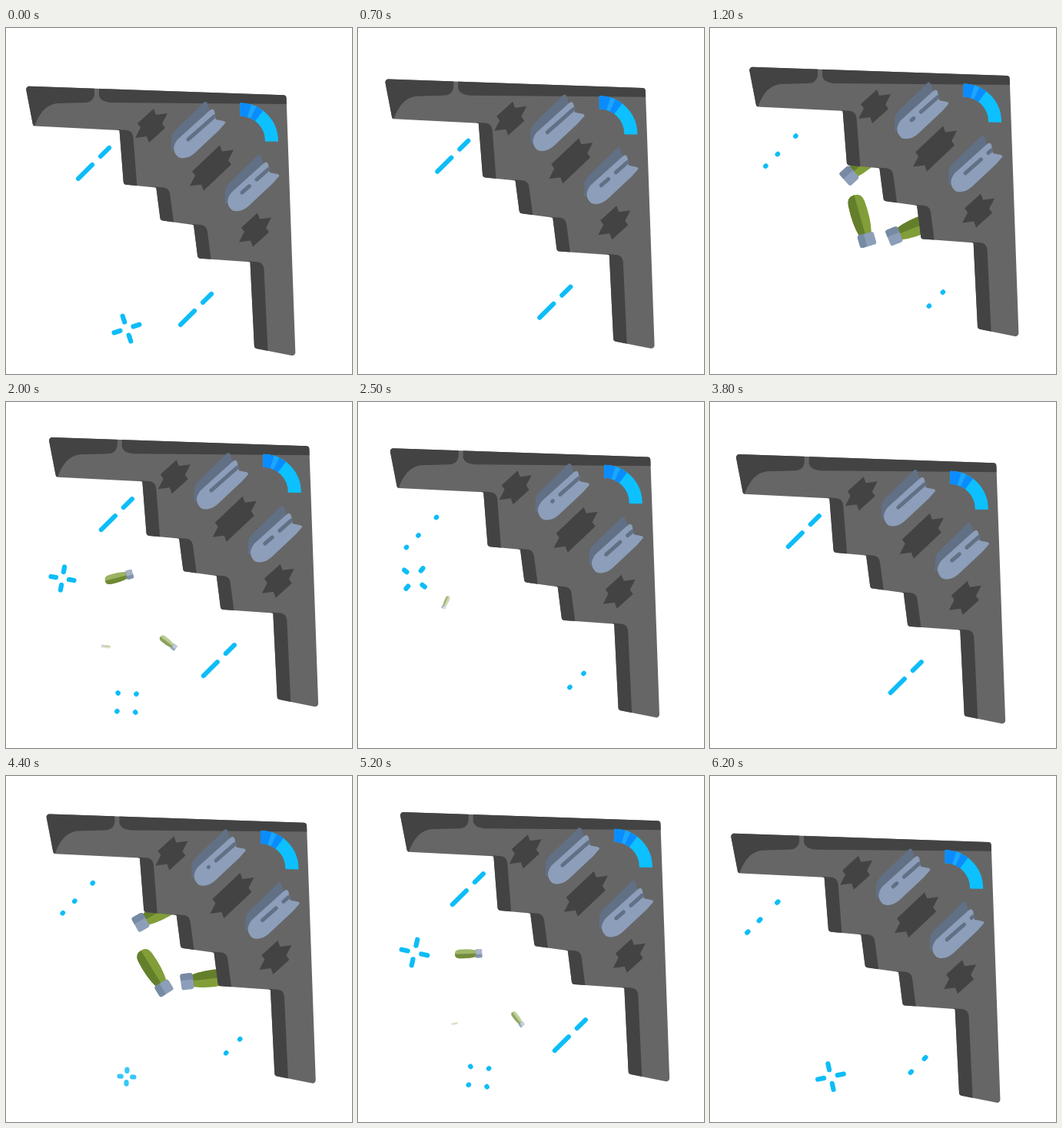
Recreate the animation shown at these times as an HTML page with a canvas. Size 450x450 px, loop 6.3 s.

```html
<!DOCTYPE html>
<html>
<head>
<meta charset="utf-8">
<style>
html, body { margin: 0; width: 100%; height: 100%; overflow: hidden; background: #fff; }
canvas { display: block; }
</style>
</head>
<body>
<canvas id="stage" width="450" height="450"></canvas>
<script>
const ctx = document.getElementById('stage').getContext('2d');
const CYCLE = 3150, FLICKER = 630, STEP = 100, LOOP = 6300;
const GREY = '#666', DARK = '#434343', STEEL = '#8c9eb9', SLATE = '#617085', CYAN = '#0dbdf8';
const clamp = (v, lo = 0, hi = 1) => Math.min(hi, Math.max(lo, v));
const mix = (a, b, k) => a + (b - a) * k;
const rad = deg => deg * Math.PI / 180;

function fill(d, color) {
  ctx.fillStyle = color;
  ctx.fill(new Path2D(d));
}

function line(x1, y1, x2, y2, width, color) {
  ctx.lineWidth = width;
  ctx.strokeStyle = color;
  ctx.lineCap = 'round';
  ctx.beginPath();
  ctx.moveTo(x1, y1);
  ctx.lineTo(x2 + 0.01, y2);
  ctx.stroke();
}

// Steps of the trailing edge: where each one starts and how far it drops.
const steps = [
  { x: 147.5, y: 133, drop: 70.5 },
  { x: 195.3, y: 207.5, drop: 42.5 },
  { x: 244, y: 256, drop: 43.5 },
  { x: 317.5, y: 304.3, drop: 112 }
];

function hull() {
  const points = [[35.3, 127.5, 3]];
  for (const { x, y, drop } of steps) points.push([x, y, 1], [x + 5.5, y + drop, 4]);
  points.push([376.5, 427, 4], [364.5, 87.3, 4], [25.3, 75.7, 4]);
  ctx.beginPath();
  ctx.moveTo(30, 100);
  points.forEach(([x, y, r], i) => {
    const next = points[(i + 1) % points.length];
    ctx.arcTo(x, y, next[0], next[1], r);
  });
  ctx.closePath();
}

function stepShade({ x, y, drop }) {
  ctx.beginPath();
  ctx.moveTo(x - 2, y - 1);
  ctx.lineTo(x + 10, y);
  ctx.quadraticCurveTo(x + 17, y + 1, x + 18, y + 9);
  ctx.lineTo(x + 23, y + drop + 4);
  ctx.lineTo(x + 2, y + drop + 4);
  ctx.fillStyle = DARK;
  ctx.fill();
}

// A ragged diagonal patch: one torn end, repeated by point symmetry.
function patch(x, y, stretch) {
  const end = [[3, -22], [6, -14], [21, -16], [14, -2.5], [18, 3]];
  ctx.beginPath();
  for (const side of [1, -1])
    for (const [px, py] of end) ctx.lineTo(x + side * (px + stretch), y + side * (py - stretch));
  ctx.fillStyle = DARK;
  ctx.fill();
}

function slot(gap) {
  const dash = (a, b) => {
    if (b >= a) line(mix(237, 271, a), mix(145, 115, a), mix(237, 271, b), mix(145, 115, b), 5, SLATE);
  };
  if (gap < -0.05 || gap > 1.05) return dash(0, 1);
  dash(0, gap - 0.14);
  dash(gap + 0.14, 1);
}

function bay(dx, dy, gap) {
  ctx.save();
  ctx.translate(dx, dy);
  fill('M215 160L215 143Q216 137 221 132L257 97Q260 94 262 98L265 108L270 106L226 152Z', SLATE);
  fill('M223 145L264 108Q269 103 271 108L273 119L283 121Q287 122 284 125L277 133L245 163Q234 172 224 168Q213 158 223 145Z', STEEL);
  slot(gap);
  ctx.restore();
}

function gauge() {
  const band = (from, to, color) => {
    ctx.lineWidth = 17;
    ctx.lineCap = 'butt';
    ctx.strokeStyle = color;
    ctx.beginPath();
    ctx.arc(304.5, 147, 41, rad(from), rad(to));
    ctx.stroke();
  };
  band(-90, 1, '#0dc0ff');
  band(-90, -53, '#0a8cff');
  band(-73, -65, '#1ba6ff');
}

function plane(phase) {
  ctx.save();
  hull();
  ctx.fillStyle = GREY;
  ctx.fill();
  ctx.clip();
  fill('M20 70L115 76L115 87Q113 97 102 97L66 98Q47 100 37 128L30 128Z', DARK);
  fill('M121 78L370 86L370 99L136 97Q123 96 121 88Z', DARK);
  steps.forEach(stepShade);
  ctx.restore();

  patch(189, 127, 0);
  patch(267.5, 182, 7.5);
  patch(324, 262.5, 0);

  const gap = phase < 0.5 ? 0.42 : 1.6 - 0.95 * phase;
  bay(0, 0, gap - 0.52);
  bay(70, 69, gap);
  gauge();
}

// Dashes lie on a rising diagonal; each offset is a dash start along it.
function trail(x, y, offsets, size) {
  for (const [offset, length] of offsets) {
    const d = length * size + 0.6;
    line(x + offset, y - offset, x + offset + d, y - offset - d, 6, CYAN);
  }
}

function trails(phase) {
  if (phase < 0.5) {
    const size = clamp((0.5 - phase) / 0.15), pair = [[0, 17.5], [29, 10.5]];
    trail(94, 196, pair, size);
    trail(227, 386, pair, size);
  } else {
    const size = Math.min(clamp((phase - 0.5) / 0.12), clamp((0.86 - phase) / 0.2));
    trail(47, 205, [[0, 9], [15.5, 14], [39, 9]], size);
    trail(259.5, 387, [[0, 9], [18, 14]], size);
  }
}

// Pose at RELEASE; speed, spin and shrink are per second.
const RELEASE = 1200;
const bombs = [
  { x: 200, y: 175, speed: 66, angle: 138, spin: 259, shrink: 40 },
  { x: 197, y: 251, speed: 84, angle: 74, spin: -311, shrink: 72 },
  { x: 263, y: 261, speed: 65, angle: 158, spin: 300, shrink: 55 }
];

function bomb({ x, y, speed, angle, spin, shrink }, t) {
  const s = (t - RELEASE) / 1000;
  const len = Math.min(70, 70 - shrink * s);
  if (t < 500 || len <= 1) return;
  ctx.save();
  ctx.globalAlpha = clamp(len / 48);
  ctx.translate(x - speed * s, y + speed * s);
  ctx.rotate(rad(angle + spin * s));
  ctx.scale(len / 70, len / 70);
  fill('M-24 -11Q-35 -10 -35 0Q-35 10 -24 11Q0 13 19 8L19 -8Q0 -13 -24 -11Z', '#829e38');
  fill('M-35 0Q-35 10 -24 11Q0 13 19 8L19 0Z', '#647f2b');
  fill('M21 -11L31 -11Q34 -11 34 -8L34 8Q34 11 31 11L21 11Q17 11 17 8L17 -8Q17 -11 21 -11Z', STEEL);
  fill('M17 2L34 2L34 8Q34 11 31 11L21 11Q17 11 17 8Z', '#778aa3');
  ctx.restore();
}

// Four arms grow out, turn, then shrink to dots at their tips.
function cross(x, y, spin, age) {
  if (age <= 0 || age >= 900) return;
  const grow = clamp(0.4 + age / 330);
  const outer = 17.2 * grow;
  const inner = mix(mix(5, 9, grow), 16.6, clamp((age - 500) / 300));
  ctx.save();
  ctx.globalAlpha = clamp(age / 60);
  ctx.translate(x, y);
  ctx.rotate(rad(spin * age / 1000));
  for (let i = 0; i < 4; i++) {
    line(inner, 0, outer, 0, 6.2, CYAN);
    ctx.rotate(Math.PI / 2);
  }
  ctx.restore();
}

function draw(time) {
  const t = time % CYCLE, phase = time % FLICKER / FLICKER;
  const since = born => (t - born + CYCLE) % CYCLE;
  const drift = 16.6 * (1 - Math.cos(2 * Math.PI * (t - 125) / CYCLE)) - 0.5;
  ctx.fillStyle = '#fff';
  ctx.fillRect(0, 0, 450, 450);
  cross(157, 391, 60, since(1200));
  cross(157, 391, -60, since(2850));
  cross(73.5, 229.5, 60, since(1840));
  for (const b of bombs) bomb(b, t);
  ctx.save();
  ctx.translate(drift, -drift);
  trails(phase);
  plane(phase);
  ctx.restore();
}

const start = performance.now();
function tick() {
  const elapsed = (performance.now() - start) % LOOP;
  draw(Math.floor(elapsed / STEP) * STEP);
  requestAnimationFrame(tick);
}
tick();
</script>
</body>
</html>
```
